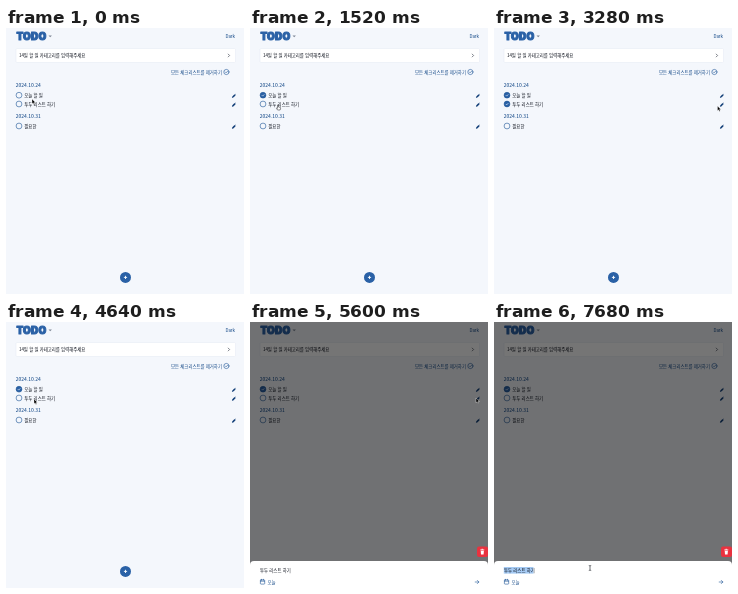
Recreate the animation shown at these times as an HTML page. Size 238 by 266 pixels, loop 8 s.

```html
<!DOCTYPE html>
<html lang="ko">
<head>
<meta charset="utf-8">
<title>TODO</title>
<style>
  html, body { margin: 0; width: 100%; height: 100%; overflow: hidden; background: #f4f7fc; }
  svg { display: block; width: 238px; height: 266px; }
  text { font: 500 4.4px "Noto Sans CJK KR", "Noto Sans CJK", "Noto Sans CJK JP", sans-serif; fill: #060b16; white-space: pre; }
  .blue { fill: #0f4585; }
  .date { font-size: 5px; }
  .logo { font: 900 10px Inter, sans-serif; letter-spacing: .2px; fill: #2a61a6; stroke: #2a61a6; stroke-width: 1; stroke-linejoin: round; }
  .line { fill: none; stroke: #1d5596; stroke-width: .6; stroke-linecap: round; stroke-linejoin: round; }
  .ring { stroke: #1d5596; stroke-width: .6; }
</style>
</head>
<body>
<svg viewBox="0 0 238 266">
  <defs>
    <path id="pencil" d="M-1.9 1.9 L-1.5 .5 L.7 -1.7 L1.8 -.6 L-.5 1.6 Z M1.1 -2 L1.4 -2.2 L2.2 -1.3 L2 -1 Z" fill="#123f78"/>
  </defs>
  <rect width="238" height="266" fill="#f4f7fc"/>

  <text class="logo" x="10.4" y="11.7">TODO</text>
  <path d="M42.5 7.5 h3.4 l-1.7 1.8 Z" fill="#7d8694"/>
  <text class="blue" x="229" y="9.8" text-anchor="end">Dark</text>

  <rect x="10" y="20.5" width="219.5" height="14" rx="1" fill="#fff" stroke="#e8edf5" stroke-width=".6"/>
  <text x="13" y="29.1">14일 할 일 카테고리를 입력해주세요</text>
  <path class="line" d="M222.2 26.1 l1.4 1.4 l-1.4 1.4" style="stroke:#2b323e"/>

  <text class="blue" x="165" y="45.6">모든 체크리스트를 제거하기</text>
  <circle class="line" cx="220.4" cy="44" r="2.6"/>
  <path class="line" d="M219.3 44 l.8 .8 l1.4 -1.5"/>

  <text class="blue date" x="9.8" y="59.2">2024.10.24</text>
  <text class="blue date" x="9.8" y="90">2024.10.31</text>
  <g id="items"></g>

  <circle cx="119.5" cy="249.4" r="5.5" fill="#2a61a6"/>
  <path d="M119.5 247.8 v3.2 M117.9 249.4 h3.2" stroke="#fff" stroke-width=".9"/>

  <g id="sheet">
    <rect width="238" height="266" fill="#000" fill-opacity=".54"/>
    <rect x="227" y="224.5" width="11" height="10.5" rx="2" fill="#e9323f"/>
    <path d="M230.3 227.9 h4 M231.5 227.3 h1.6" stroke="#fff" stroke-width=".8"/>
    <path d="M230.7 228.8 h3.2 l-.3 3.6 h-2.6 Z" fill="#fff"/>
    <path d="M0 266 V243 Q0 239 4 239 H234 Q238 239 238 243 V266 Z" fill="#fff"/>
    <rect id="mark" x="9.8" y="245" width="29.6" height="6.6" fill="#a5caf3"/>
    <text x="10" y="249.8">투두 리스트 하기</text>
    <rect class="line" x="10.4" y="257.9" width="4.3" height="4.2" rx=".6"/>
    <path class="line" d="M10.5 259.2 h4.1 M11.6 257.3 v.8 M13.5 257.3 v.8"/>
    <text class="blue" x="17.5" y="261.6">오늘</text>
    <path class="line" d="M225.2 260 h3.6 M227.3 258.4 l1.6 1.6 l-1.6 1.6"/>
  </g>

  <g id="cursor">
    <path id="arrow" d="M0 0 V4.8 L1.1 3.8 L1.9 5.4 L2.7 5 L2 3.5 H3.4 Z" fill="#000" stroke="#fff" stroke-width=".35"/>
    <path id="hand" d="M-.5 .1 Q0 -.5 .5 .1 V2 L2.2 2.4 Q2.7 2.6 2.6 3.3 L2.1 5 H-.4 L-1.7 3.3 Q-1.4 2.6 -.5 3.3 Z" fill="#fff" stroke="#14171c" stroke-width=".5" stroke-linejoin="round"/>
    <path id="beam" d="M-1.2 -2.5 Q0 -2.5 0 -1.8 Q0 -2.5 1.2 -2.5 M0 -1.8 V1.8 M-1.2 2.5 Q0 2.5 0 1.8 Q0 2.5 1.2 2.5" fill="none" stroke="#23272e" stroke-width=".65"/>
  </g>
</svg>
<script>
const LOOP = 8000;
const $ = id => document.getElementById(id);

const items = [
  { y: 67.2, text: "오늘 할 일", done: t => t >= 800 },
  { y: 76, text: "투두 리스트 하기", done: t => t >= 1760 && t < 4560 },
  { y: 98, text: "필요한", done: () => false }
];

$("items").innerHTML = items.map(({ y, text }) => `
  <circle class="ring" cx="13" cy="${y}" r="2.9"/>
  <path d="M11.8 ${y} l.9 .9 l1.6 -1.7" fill="none" stroke="#fff" stroke-width=".6"/>
  <text x="18.3" y="${y + 1.6}">${text}</text>
  <use href="#pencil" x="227.8" y="${y + .8}"/>`).join("");

const rings = document.querySelectorAll(".ring");
const ticks = document.querySelectorAll("#items path");

// places where the pointer rests
const first = { x: 26, y: 71, kind: "arrow" };
const second = { x: 28, y: 77, kind: "hand" };
const edit = { x: 226, y: 76, kind: "hand" };
const beside = { x: 223.5, y: 78, kind: "arrow" };
const field = { x: 96, y: 246, kind: "beam" };

const moves = [
  { start: 1040, end: 1280, to: second },
  { start: 2160, end: 3040, to: beside },
  { start: 3280, end: 3920, to: second },
  { start: 4640, end: 5360, to: edit },
  { start: 5600, end: 6240, to: field }
];

const clamp = p => Math.min(1, Math.max(0, p));
const ease = p => p * p * (3 - 2 * p);

function pointer(t) {
  let { x, y, kind } = first;
  for (const { start, end, to } of moves) {
    const p = ease(clamp((t - start) / (end - start)));
    x += (to.x - x) * p;
    y += (to.y - y) * p;
    if (t >= start) kind = p > .95 ? to.kind : "arrow";
  }
  return { x, y, kind };
}

const show = (id, on) => $(id).setAttribute("display", on ? "inline" : "none");

function draw(t) {
  items.forEach((item, i) => {
    const on = item.done(t);
    rings[i].style.fill = on ? "#2a61a6" : "none";
    ticks[i].style.display = on ? "inline" : "none";
  });
  show("sheet", t >= 5600);
  show("mark", t >= 7200);

  const { x, y, kind } = pointer(t);
  $("cursor").setAttribute("transform", `translate(${x} ${y})`);
  for (const id of ["arrow", "hand", "beam"]) show(id, id === kind);
}

const start = performance.now();
function tick() {
  draw((performance.now() - start) % LOOP);
  requestAnimationFrame(tick);
}
tick();
</script>
</body>
</html>
```
